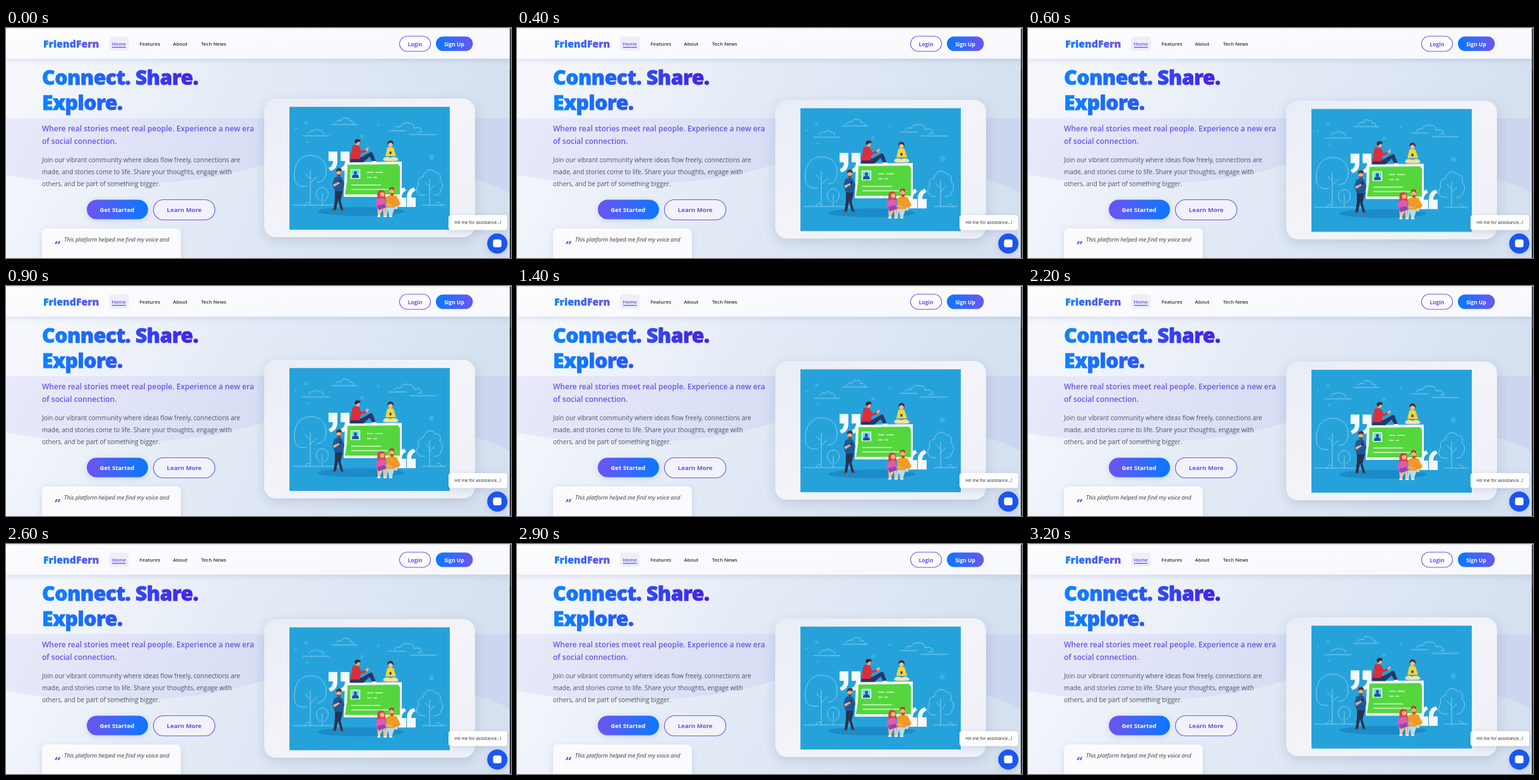
An HTML page for the animation above (3.3 s loop, 800 by 365 pixels).

```html
<!DOCTYPE html>
<html lang="en">
<head>
<meta charset="utf-8">
<title>Social landing page</title>
<style>
  html, body { margin: 0; width: 100%; height: 100%; overflow: hidden; background: #e6ecf6; }
  svg { display: block; width: 800px; height: 365px; font-family: "Open Sans", "Noto Sans", sans-serif; }
  .float {
    animation: float 6s ease-in-out infinite paused;
    animation-delay: calc(var(--t, 4000) * -1ms);
  }
  @keyframes float {
    0%, 100% { transform: translateY(0); }
    50% { transform: translateY(-10.4px); }
  }
  .logo { font-size: 15.9px; font-weight: 800; fill: url(#logoInk); stroke: url(#logoInk); stroke-width: .3; }
  .nav { font-size: 7.8px; font-weight: 600; fill: #2c2c40; }
  .title { font-size: 32px; font-weight: 800; letter-spacing: -.6px; fill: url(#titleInk); stroke: url(#titleInk); stroke-width: .8; }
  .lead { font-size: 12.02px; font-weight: 600; fill: #6c55e8; }
  .body { font-size: 9.96px; fill: #4c5163; }
  .btn { font-weight: 700; text-anchor: middle; }
  .small { font-size: 8.5px; }
  .big { font-size: 9.6px; }
  .said { font-size: 8.88px; font-style: italic; fill: #34364a; }
  .mark { font-size: 20px; font-weight: 700; font-style: italic; fill: #6a55ea; }
  .tip { font-size: 6.85px; fill: #22242c; }
  .line { fill: none; stroke: #9fd8f4; stroke-width: .85; stroke-linecap: round; }
</style>
</head>
<body>
<svg viewBox="0 0 800 365">
  <defs>
    <linearGradient id="sky" gradientUnits="userSpaceOnUse" x1="60" y1="0" x2="640" y2="330">
      <stop stop-color="#f6f8fd"/><stop offset=".5" stop-color="#e4ebf6"/><stop offset="1" stop-color="#d5e1ef"/>
    </linearGradient>
    <linearGradient id="bar" x2="1" y2="1">
      <stop stop-color="#fdfdff"/><stop offset="1" stop-color="#f7f8fd"/>
    </linearGradient>
    <linearGradient id="titleInk" gradientUnits="userSpaceOnUse" x1="57" x2="310">
      <stop stop-color="#0c84ff"/><stop offset=".5" stop-color="#2b55f6"/><stop offset="1" stop-color="#4a1be4"/>
    </linearGradient>
    <linearGradient id="logoInk" gradientUnits="userSpaceOnUse" x1="59" x2="148">
      <stop stop-color="#0f7dff"/><stop offset="1" stop-color="#6a4df0"/>
    </linearGradient>
    <linearGradient id="blueViolet">
      <stop stop-color="#0a78ff"/><stop offset="1" stop-color="#6c55f2"/>
    </linearGradient>
    <linearGradient id="violetBlue">
      <stop stop-color="#6c55f2"/><stop offset="1" stop-color="#0a78ff"/>
    </linearGradient>
    <linearGradient id="glass" x2="1" y2="1">
      <stop stop-color="#e9edf6"/><stop offset=".5" stop-color="#f3f4f9"/><stop offset="1" stop-color="#edf0f6"/>
    </linearGradient>
    <filter id="soft" x="-20%" y="-30%" width="140%" height="170%">
      <feDropShadow dx="0" dy="5" stdDeviation="8" flood-color="#34487c" flood-opacity=".18"/>
    </filter>
    <filter id="low" x="-20%" y="-40%" width="140%" height="200%">
      <feDropShadow dx="0" dy="2.5" stdDeviation="4" flood-color="#4a55a8" flood-opacity=".18"/>
    </filter>
    <path id="quote" d="M0 0H14V15C14 24 10 29 3 31L0 26C5 24 7 20 7 15H0Z"/>
  </defs>

  <rect width="800" height="365" fill="url(#sky)"/>
  <path d="M0 143H800V263C780 251 762 245 743 241C650 240 570 196 480 202C430 207 390 225 330 236C270 246 200 250 140 247C85 245 40 241 0 233Z" fill="#6c5ce7" opacity=".088"/>

  <!-- Header -->
  <rect y="1" width="800" height="47.5" fill="url(#bar)" filter="url(#low)"/>
  <rect width="800" height="1.5" fill="#e5e5ea"/>
  <text class="logo" x="59" y="31">FriendFern</text>
  <rect x="163.5" y="13.5" width="31" height="22.5" rx="4" fill="#eeedf9"/>
  <text class="nav" x="167.5" y="28" style="fill:#6550e6">Home</text>
  <rect x="168" y="30" width="22" height="1.3" fill="url(#blueViolet)"/>
  <text class="nav" x="211.5" y="28">Features</text>
  <text class="nav" x="264.5" y="28">About</text>
  <text class="nav" x="309" y="28">Tech News</text>
  <rect x="623.5" y="13" width="49" height="24" rx="12" fill="#fdfdff" stroke="#6c55e8" stroke-width="1.1"/>
  <text class="btn small" x="648" y="28.5" fill="#6650e6">Login</text>
  <rect x="681" y="13.5" width="58.5" height="23" rx="11.5" fill="url(#blueViolet)"/>
  <text class="btn small" x="710" y="28.5" fill="#fff">Sign Up</text>

  <!-- Hero copy -->
  <text class="title" x="57" y="89.5">Connect. Share.</text>
  <text class="title" x="57" y="129.7">Explore.</text>
  <text class="lead" x="57" y="163.5">Where real stories meet real people. Experience a new era</text>
  <text class="lead" x="57" y="184">of social connection.</text>
  <text class="body" x="57" y="212.5">Join our vibrant community where ideas flow freely, connections are</text>
  <text class="body" x="57" y="231.5">made, and stories come to life. Share your thoughts, engage with</text>
  <text class="body" x="57" y="250.5">others, and be part of something bigger.</text>
  <rect x="128" y="272.5" width="97" height="31" rx="15.5" fill="url(#violetBlue)" filter="url(#low)"/>
  <text class="btn big" x="176" y="291.5" fill="#fff">Get Started</text>
  <rect x="233.5" y="272.5" width="97.5" height="32" rx="16" fill="#f1f2fb" stroke="#6c55e8" stroke-width="1.1"/>
  <text class="btn big" x="282.3" y="292" fill="#6650e6">Learn More</text>
  <rect x="57" y="318" width="220" height="70" rx="8" fill="#fbfbfe" filter="url(#low)"/>
  <text class="mark" x="76" y="352">“</text>
  <text class="said" x="92" y="338.5">This platform helped me find my voice and</text>

  <!-- Floating picture -->
  <g class="float"><g transform="translate(0 8.07)">
    <rect x="409" y="112" width="334" height="220" rx="19" fill="url(#glass)" filter="url(#soft)"/>
    <rect x="449" y="125" width="254" height="195" fill="#26a2db"/>

    <g fill="#3fb0e2">
      <circle cx="475" cy="150" r="3"/><circle cx="564" cy="172" r="3"/>
      <circle cx="590" cy="154" r="2"/><circle cx="674" cy="205" r="4"/>
      <circle cx="477" cy="181" r="2"/><circle cx="459" cy="160" r="2"/>
    </g>
    <g class="line">
      <path d="M516 153H556M522 150q3-5 9-3q2-7 8-4q6-1 6 5q6-2 6 5"/>
      <path d="M470 171H512M480 167q2-6 8-4q4-5 9 0q6-1 6 5"/>
      <path d="M607 163H634M615 160q4-6 9-3q5-8 14-6q8 0 9 8q8-4 12 4M640 169H682M652 166q4-4 8 0"/>
      <path d="M482 281V226M482 246L492 236M482 239L474 231M476 251C464 254 457 246 457 238C455 216 466 202 482 202C499 202 509 214 507 230C506 240 500 245 493 245"/>
      <path d="M501 281V262M498 274C489 270 489 254 501 253C513 254 513 270 504 274"/>
      <path d="M671 281V240M671 258L679 249M671 252L664 245M664 265H657C649 262 649 253 654 249C651 241 656 236 661 236C663 225 674 221 680 229C688 229 690 237 687 241C694 247 692 254 689 257C689 263 683 266 678 265"/>
      <path d="M697 281H660M454 281H530M474 281q2-7 7-4M690 281q-2-6-7-4"/>
    </g>

    <ellipse cx="562" cy="291" rx="69" ry="7" fill="#1b8cc8"/>
    <g fill="#f4f8fb">
      <use href="#quote" x="511" y="196"/><use href="#quote" x="530" y="196"/>
      <use href="#quote" transform="translate(634 284) rotate(180)"/>
      <use href="#quote" transform="translate(649 284) rotate(180)"/>
    </g>

    <path d="M537 213L627 212V268H535Z" fill="#f5f9f8"/>
    <path d="M541 217L621 216L624 220V264H537L540 244Z" fill="#55d63d"/>
    <rect x="546.5" y="224.5" width="14" height="14" fill="#72dfe2" stroke="#fff" stroke-width="1.2"/>
    <circle cx="553.5" cy="229.5" r="2.5" fill="#244da0"/>
    <path d="M548 238q0-6 5.5-6q5.5 0 5.5 6Z" fill="#244da0"/>
    <path d="M572 229H582M585 229H597M572 237H579M582 237H588M547 249H594M547 256H617" stroke="#f2fff0" stroke-width="1.2"/>

    <!-- Reader in red -->
    <path d="M546 206L563 205L577 197Q580 196 581 199L586 212L581 213L576 204L566 213H545Z" fill="#263765"/>
    <path d="M549 187Q554 184 559 187L563 195L570 193L571 196L562 199L560 208H545Z" fill="#d92f3d"/>
    <path d="M569 193l4-4l2 2l-3 5Z" fill="#f3b183"/>
    <circle cx="557" cy="182.5" r="3.4" fill="#f3b183"/>
    <path d="M552.5 182q-1-6 5-5.500q5 0 4 4q-5-1-6 3Z" fill="#3a2430"/>
    <path d="M580 211h6l1 2h-7Z" fill="#f5f5f5"/>

    <!-- Reader in yellow -->
    <path d="M604 190Q609 187 614 190L618 203H601Z" fill="#f9d630"/>
    <path d="M597 209Q600 202 609 206Q618 202 622 209Q619 212 609 211Q599 212 597 209Z" fill="#f3e3a0"/>
    <circle cx="609" cy="185" r="3.6" fill="#f5bd91"/>
    <path d="M604.500 186q-1-8 5-7.500q5 0 4.500 7.500q-2-4-5-4q-3 0-4.500 4Z" fill="#44283a"/>
    <path d="M606 198h6v3h-6Z" fill="#f5bd91"/>
    <path d="M607.500 196h3v4h-3Z" fill="#263765"/>

    <!-- Standing man -->
    <path d="M521 257H534L530 274L534 288H530L526 273L523 288H519L521 272Z" fill="#263252"/>
    <path d="M520 238Q526 233 532 237L536 247L533 259H521L517 248Z" fill="#1e5799"/>
    <path d="M518 248l10-4l1 2l-9 6Z" fill="#eeb086"/>
    <path d="M528 241h2.500v4h-2.500Z" fill="#202a42"/>
    <circle cx="527" cy="230" r="3.700" fill="#f0b184"/>
    <path d="M523 229q-1-7 5-6.500q5 0 3 5l-5-1Z" fill="#593127"/>
    <path d="M523.500 231q4 3 7 0l-1 4q-4 2-6-4Z" fill="#74402d"/>
    <path d="M518 288h5v2h-6ZM530 288h4l3 2h-7Z" fill="#7c4638"/>

    <!-- Couple -->
    <path d="M589 273q-3-17 6-16q8 1 5 16Z" fill="#d9423b"/>
    <path d="M588 282Q595 274 602 281L601 298H598L597 287L592 298L589 297Z" fill="#f3bd9c"/>
    <path d="M587 273Q594 267 600 271L602 284L589 287L585 280Z" fill="#e05ab0"/>
    <path d="M588 282L600 279L602 285L590 289Z" fill="#8d47b0"/>
    <circle cx="596" cy="264" r="3.500" fill="#f5b68c"/>
    <path d="M603 282H622L619 288L615 287L611 299H607L605 288L603 299H600Z" fill="#b9dde8"/>
    <path d="M602 268Q611 262 619 267L625 279L620 284L616 279V285H603Z" fill="#f39a24"/>
    <circle cx="611" cy="259" r="4" fill="#f0b184"/>
    <path d="M606.500 259q-1-7 5-6.500q5 0 4 7q-2-4-6-4Z" fill="#a24a20"/>
    <path d="M608 261q4 2 7 0l-2 5q-4 1-5-5Z" fill="#b4521f"/>
    <path d="M602 278l9 3v2l-9-2Z" fill="#f0b184"/>
    <path d="M589 297h4v3h-5ZM598 298h5v2h-5ZM607 298h5v2h-5Z" fill="#f4f4f6"/>
  </g></g>

  <!-- Chat helper -->
  <rect x="701" y="297" width="93" height="23.5" rx="4" fill="#fff" filter="url(#low)"/>
  <text class="tip" x="710.5" y="311.3">Hit me for assistance...!</text>
  <circle cx="778.3" cy="342" r="16" fill="#1f55ee" filter="url(#low)"/>
  <rect x="771.5" y="335.5" width="13.5" height="12.5" rx="3.5" fill="#fff"/>

  <!-- Scrollbar -->
  <rect x="798" y="1" width="2" height="364" fill="#2c2c30"/>
  <rect x="798" y="2" width="2" height="64" fill="#43434c"/>
</svg>
<script>
  const LOOP = 3300, STEP = 100, PHASE = 4000;
  const start = performance.now();
  function tick() {
    const time = (performance.now() - start) % LOOP;
    const t = PHASE + Math.floor(time / STEP) * STEP;
    document.documentElement.style.setProperty('--t', t);
    requestAnimationFrame(tick);
  }
  tick();
</script>
</body>
</html>
```
